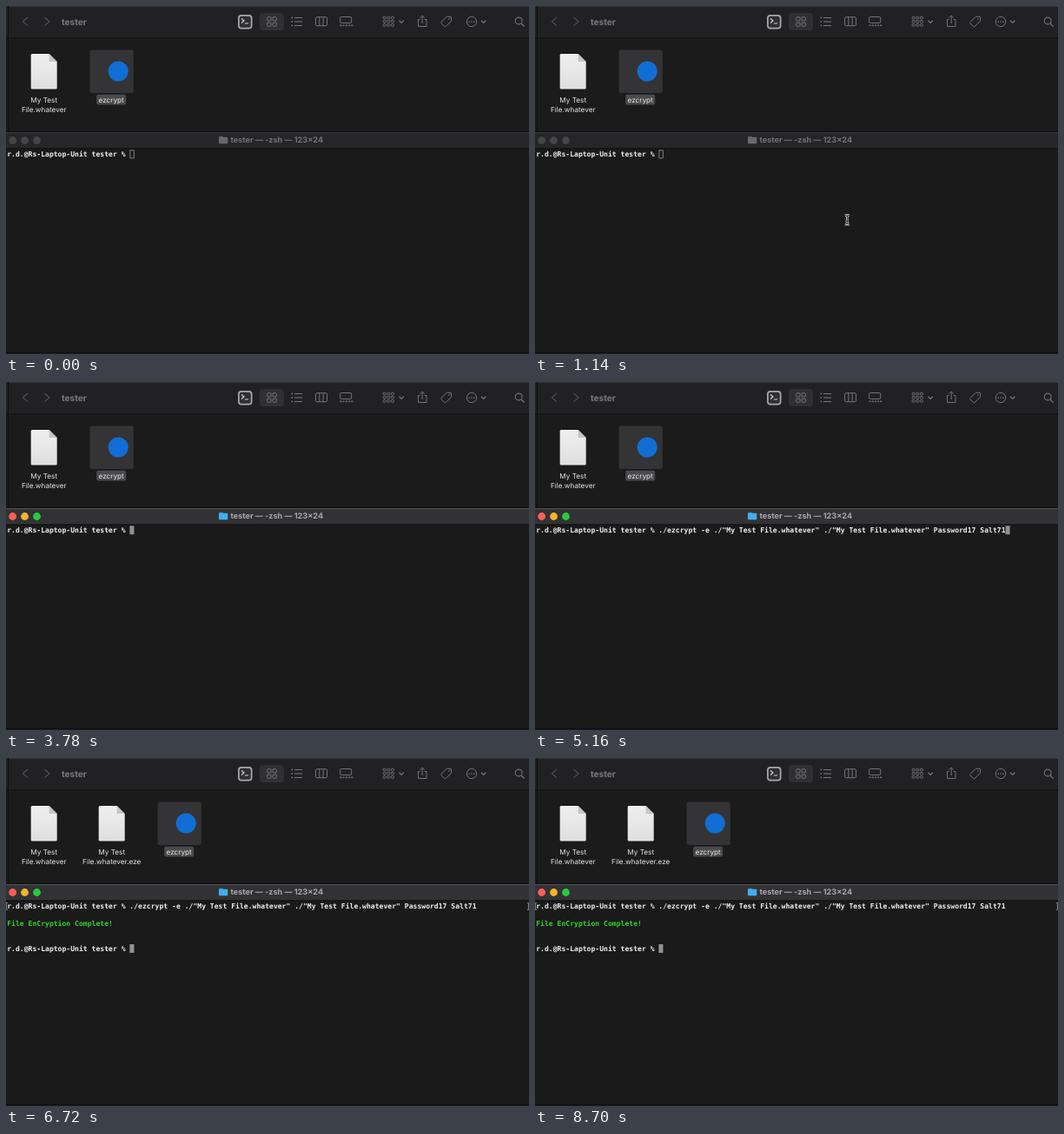
These frames come from a looping animation (602 px wide and 400 px high, 8.82 s). An HTML page with a canvas:

```html
<!DOCTYPE html>
<html lang="en">
<head>
<meta charset="utf-8">
<title>Encrypting a file from the shell</title>
<style>
html, body { margin: 0; width: 100%; height: 100%; overflow: hidden; background: #1a1a1a; }
canvas { display: block; }
</style>
</head>
<body>
<canvas id="stage" width="602" height="400"></canvas>
<script>
const c = document.getElementById('stage').getContext('2d');
const LOOP = 8820;
const T = { arrowIn: 540, arrowStop: 840, arrowOut: 980, beamIn: 1120, focus: 1260,
            beamOut: 3780, paste: 4340, output: 6440, listing: 6560 };

const SANS = 'Inter, sans-serif';
const MONO = '"DejaVu Sans Mono", monospace';
const COL = 4.868, ROW = 9.75, LEFT = 1.2, BASE = 173.2;
const PROMPT = 'r.d.@Rs-Laptop-Unit tester % ';
const COMMAND = './ezcrypt -e ./"My Test File.whatever" ./"My Test File.whatever" Password17 Salt71';

function rect(x, y, w, h, color) {
  c.fillStyle = color;
  c.fillRect(x, y, w, h);
}

function round(x, y, w, h, r, color) {
  c.beginPath();
  c.roundRect(x, y, w, h, r);
  c.fillStyle = color;
  c.fill();
}

function outline(x, y, w, h, r, color, width = 1) {
  c.beginPath();
  c.roundRect(x, y, w, h, r);
  c.strokeStyle = color;
  c.lineWidth = width;
  c.stroke();
}

function disc(x, y, r, color) {
  c.beginPath();
  c.arc(x, y, r, 0, Math.PI * 2);
  c.fillStyle = color;
  c.fill();
}

function ring(x, y, r, color, width = 1) {
  c.beginPath();
  c.arc(x, y, r, 0, Math.PI * 2);
  c.strokeStyle = color;
  c.lineWidth = width;
  c.stroke();
}

function path(d, color, width = 1) {
  c.strokeStyle = color;
  c.lineWidth = width;
  c.stroke(new Path2D(d));
}

function text(s, x, y, font, color, align = 'left') {
  c.font = font;
  c.fillStyle = color;
  c.textAlign = align;
  c.fillText(s, x, y);
}

function toolbar() {
  const dim = '#505052', mid = '#737375';
  rect(0, 0, 602, 36, '#212123');
  rect(0, 0, 602, 1, '#343436');
  rect(0, 36, 602, 1, '#111112');

  path('M25 13L19.5 17.8L25 22.6', dim, 1.2);
  path('M44.5 13L50 17.8L44.5 22.6', dim, 1.2);
  text('tester', 64, 21.6, 'bold 10.1px ' + SANS, '#7b7b7d');

  round(267, 10, 16.5, 16.5, 4, '#a9a9ab');
  round(268.7, 11.7, 13.1, 13.1, 2.5, '#303032');
  path('M271 14.5L274 17L271 19.5M275 20H279', '#d4d4d5', 1.2);

  round(292, 8, 28, 20, 4, '#303032');
  for (const x of [300.7, 307])
    for (const y of [12.7, 19]) outline(x, y, 4.3, 4.3, 1, mid);

  for (const y of [13.5, 18, 22.5]) {
    disc(329.3, y, 0.9, mid);
    path(`M332 ${y}H341`, mid, 1.1);
  }

  outline(356.5, 12.7, 13, 10, 1.5, mid);
  path('M360.8 12.7V22.7M365.2 12.7V22.7', mid);

  outline(384.7, 12.5, 13, 7, 1.5, mid);
  for (let x = 384.5; x < 398; x += 3.2) rect(x, 21.5, 2, 1.6, mid);

  for (const y of [12.3, 16.5, 20.7])
    for (const x of [434.2, 438.8, 443.4]) outline(x, y, 3, 2.5, 0.6, mid, 0.9);
  path('M452.5 16.7L455.2 19.3L457.9 16.7', mid, 1.2);

  path('M476.5 15.5H474.5V23.5H484V15.5H482M479.2 20V11.2M476.6 13.6L479.2 11L481.8 13.6', mid);
  path('M500.8 18.7L507.3 12.2L512.3 12.4L512.6 17.2L506 23.7Q505.4 24.2 504.8 23.7L500.8 19.8Q500.3 19.2 500.8 18.7Z', mid);
  disc(510, 14.8, 0.8, mid);

  ring(536, 18, 5.7, mid);
  for (const x of [533.2, 536, 538.8]) disc(x, 18, 0.85, mid);
  path('M547 16.7L549.7 19.3L552.4 16.7', mid, 1.2);

  ring(590.2, 17, 3.9, mid, 1.1);
  path('M593 20L596.5 23.5', mid, 1.2);
}

function label(lines, x) {
  lines.forEach((s, i) => text(s, x, 110.7 + i * 10.8, '8.2px ' + SANS, '#e4e4e4', 'center'));
}

function fileIcon(x, ext) {
  const left = x - 15, right = x + 15, top = 55, bottom = 95.5, fold = 9;
  const shade = c.createLinearGradient(0, top, 0, bottom);
  shade.addColorStop(0, '#efefef');
  shade.addColorStop(1, '#dfdfdf');
  c.fillStyle = shade;
  c.fill(new Path2D(`M${left + 1} ${top}H${right - fold}L${right} ${top + fold}V${bottom - 1}` +
    `L${right - 1} ${bottom}H${left + 1}L${left} ${bottom - 1}V${top + 1}Z`));
  c.fillStyle = '#c6c6c6';
  c.fill(new Path2D(`M${right - fold} ${top}V${top + fold}H${right}Z`));
  label(['My Test', 'File.whatever' + ext], x);
}

function programIcon(x) {
  round(x - 25, 50.5, 50.3, 49.5, 2.5, '#343436');
  disc(x + 7.7, 75, 11.5, '#116ed4');
  round(x - 17.3, 101.7, 34, 11.8, 2, '#4a4a4c');
  label(['ezcrypt'], x - 0.4);
}

function finder(t) {
  rect(0, 36, 602, 109, '#1b1b1b');
  toolbar();
  rect(2, 0, 1, 145, '#0e0e0e');
  fileIcon(43.7, '');
  if (t >= T.listing) fileIcon(121.7, '.eze');
  programIcon(t >= T.listing ? 199.5 : 121.5);
}

function mono(s, col, row, color) {
  c.font = `bold 8.08px ${MONO}`;
  c.fillStyle = color;
  c.textAlign = 'left';
  [...s].forEach((ch, i) => c.fillText(ch, LEFT + (col + i) * COL, BASE + row * ROW));
}

function block(col, row, filled) {
  const x = LEFT + col * COL, y = 165.3 + row * ROW;
  if (filled) rect(x, y, COL + 0.2, 9.9, '#919191');
  else outline(x + 0.5, y + 0.5, COL - 0.4, 9, 0, '#8d8d8d', 0.9);
}

function titleBar(active) {
  rect(0, 144, 602, 1, '#0b0b0b');
  rect(0, 145, 602, 19, active ? '#323234' : '#262628');
  rect(0, 145, 602, 1, active ? '#555557' : '#3c3c3e');
  rect(0, 163.4, 602, 1, '#0d0d0d');
  const lights = active ? ['#fe5f57', '#f9b32c', '#2bc840'] : ['#464648', '#464648', '#464648'];
  lights.forEach((color, i) => disc(7.7 + i * 13.9, 154.5, 4.4, color));

  round(245, 149.8, 5, 3, 1, active ? '#2191d8' : '#5f5f61');
  round(245, 150.8, 10.3, 7.5, 1, active ? '#41aeee' : '#69696b');
  text('tester — -zsh — 123×24', 258.5, 157.3, 'bold 9.1px ' + SANS, active ? '#a9a9ab' : '#737375');
}

function terminal(t) {
  const active = t >= T.focus;
  rect(0, 164, 602, 236, '#1a1a1a');
  rect(0, 398, 602, 1, '#0f0f0f');
  titleBar(active);

  const line = PROMPT + (t >= T.paste ? COMMAND : '');
  mono(line, 0, 0, '#f0f0f0');
  if (t < T.output) {
    block(line.length, 0, active);
    return;
  }
  path('M2 166.5H0.6V174.5H2M600 166.5H601.4V174.5H600', '#929292', 0.9);
  mono('File EnCryption Complete!', 0, 2, '#36d32e');
  mono(PROMPT, 0, 5, '#f0f0f0');
  block(PROMPT.length, 5, true);
}

function arrow(x, y) {
  const shape = new Path2D(`M${x} ${y}v11.6l2.7 -2.5l1.9 4.3l2 -0.9l-1.9 -4.1h3.7z`);
  c.fillStyle = '#080808';
  c.fill(shape);
  c.strokeStyle = '#ededed';
  c.lineWidth = 0.9;
  c.stroke(shape);
}

function beam(x, y) {
  const d = `M${x - 2.5} ${y - 5.5}Q${x} ${y - 5.5} ${x} ${y - 3.5}Q${x} ${y - 5.5} ${x + 2.5} ${y - 5.5}` +
    `M${x} ${y - 4}V${y + 4}M${x - 2.5} ${y + 5.5}Q${x} ${y + 5.5} ${x} ${y + 3.5}` +
    `Q${x} ${y + 5.5} ${x + 2.5} ${y + 5.5}M${x - 1.7} ${y + 1.5}H${x + 1.7}`;
  path(d, '#e2e2e2', 2.5);
  path(d, '#111', 0.9);
}

function pointer(t) {
  if (t >= T.arrowIn && t < T.arrowOut) {
    const p = Math.min(1, (t - T.arrowIn + 20) / (T.arrowStop - T.arrowIn + 20));
    const rest = (1 - p) ** 2;
    arrow(358 - 28 * rest, 245 + 155 * rest);
  } else if (t >= T.beamIn && t < T.beamOut) {
    beam(359.3, 245.7);
  }
}

function draw(now) {
  const t = (now - start) % LOOP;
  c.textRendering = 'geometricPrecision';
  finder(t);
  terminal(t);
  pointer(t);
  requestAnimationFrame(() => draw(performance.now()));
}

const start = performance.now();
draw(start);
</script>
</body>
</html>
```
